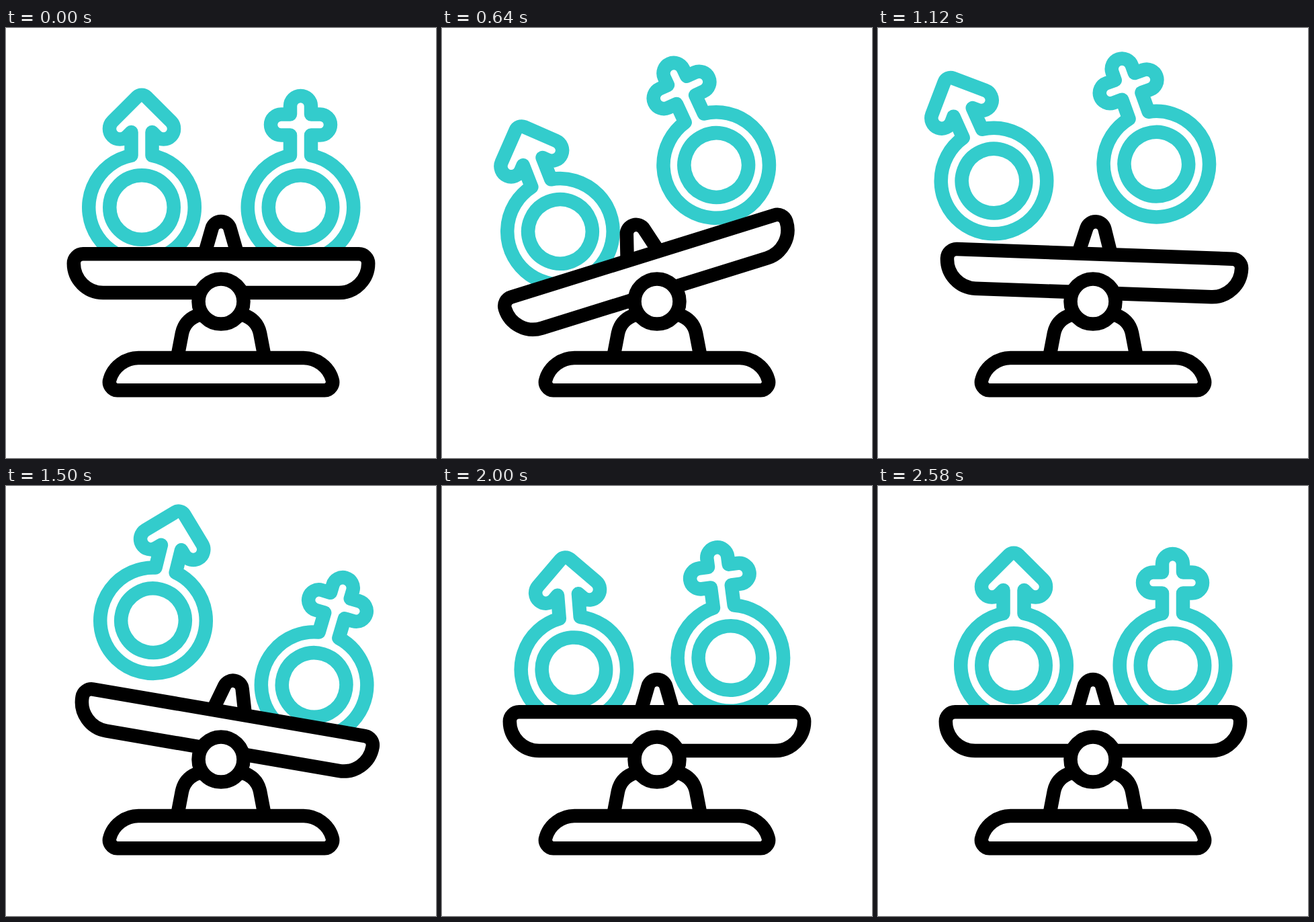
Write an HTML page that moves like this. It is 640 px wide and 640 px high and loops after 3600 ms.

```html
<!DOCTYPE html>
<html lang="en">
<head>
<meta charset="utf-8">
<title>Balance</title>
<style>
  html, body { margin: 0; height: 100%; overflow: hidden; background: #fff; }
  svg { display: block; width: 100vw; height: 100vh; }
</style>
</head>
<body>
<svg viewBox="0 0 640 640" fill="none" stroke-width="20.5" stroke-linejoin="round">
  <g stroke="#33cccc">
    <g id="male">
      <circle r="47.75"/>
      <path d="M-15.5-77.2V-112L-21.5-106A15.5 15.5 0 0 1-43.5-128L-7-164.4A10 10 0 0 1 7-164.4L43.5-128A15.5 15.5 0 0 1 21.5-106L15.5-112V-77.2A78.75 78.75 0 1 1-15.5-77.2Z"/>
    </g>
    <g id="female">
      <circle r="47.75"/>
      <path d="M-15.5-77.2V-107.5H-29A15.5 15.5 0 0 1-29-138.5H-15.5V-150.5A15.5 15.5 0 0 1 15.5-150.5V-138.5H29A15.5 15.5 0 0 1 29-107.5H15.5V-77.2A78.75 78.75 0 1 1-15.5-77.2Z"/>
    </g>
  </g>
  <g stroke="#000" fill="#fff">
    <g id="beam">
      <path d="M295.7 336L306.5 298.4A14 14 0 0 1 333.5 298.4L344.3 336"/>
      <path d="M114.8 336.3H525.2A14 14 0 0 1 539.2 350.3A43.7 43.7 0 0 1 495.5 394H144.5A43.7 43.7 0 0 1 100.8 350.3A14 14 0 0 1 114.8 336.3Z"/>
    </g>
    <path fill="none" d="M255.5 488L262 454Q266.5 434 287 427M384.5 488L378 454Q373.5 434 353 427"/>
    <circle cx="320" cy="407" r="33.5"/>
    <path d="M197 491H443C462 491 480 504 485.5 523A12.5 12.5 0 0 1 474 539.3H166A12.5 12.5 0 0 1 154.5 523C160 504 178 491 197 491Z"/>
  </g>
</svg>
<script>
const LOOP = 3600;
const ROLL = 1.22; // sideways px per degree of turn

// Each key is [ms, value]; the value eases from one key to the next
const tilt = [[80, 0], [680, -17.5], [1360, 9.8], [1480, 9.8], [1960, 0]];
const symbols = [
  {
    id: "male", x: 202,
    y: [[110, 267], [660, 303], [1390, 194], [2040, 274], [2580, 267]],
    turn: [[205, 0], [940, -33.5], [1600, 17], [1980, -4.6], [2580, 0]]
  },
  {
    id: "female", x: 438.5,
    y: [[230, 267], [815, 187], [990, 187], [1545, 298], [1980, 256], [2580, 267]],
    turn: [[160, 0], [890, -34], [1560, 17.6], [1980, -7.5], [2580, 0]]
  }
];

function valueAt(keys, t) {
  const i = keys.findIndex(([time]) => time > t);
  if (i === 0) return keys[0][1];
  if (i < 0) return keys[keys.length - 1][1];
  const [t0, v0] = keys[i - 1], [t1, v1] = keys[i];
  const u = (t - t0) / (t1 - t0);
  return v0 + (v1 - v0) * u * u * (3 - 2 * u);
}

const setTransform = (id, value) => document.getElementById(id).setAttribute("transform", value);

const start = performance.now();
function draw(now) {
  const t = Math.max(0, now - start) % LOOP;
  for (const { id, x, y, turn } of symbols) {
    const angle = valueAt(turn, t);
    setTransform(id, `translate(${x + ROLL * angle} ${valueAt(y, t)}) rotate(${angle})`);
  }
  setTransform("beam", `rotate(${valueAt(tilt, t)} 320 407)`);
  requestAnimationFrame(draw);
}
draw(start);
</script>
</body>
</html>
```
